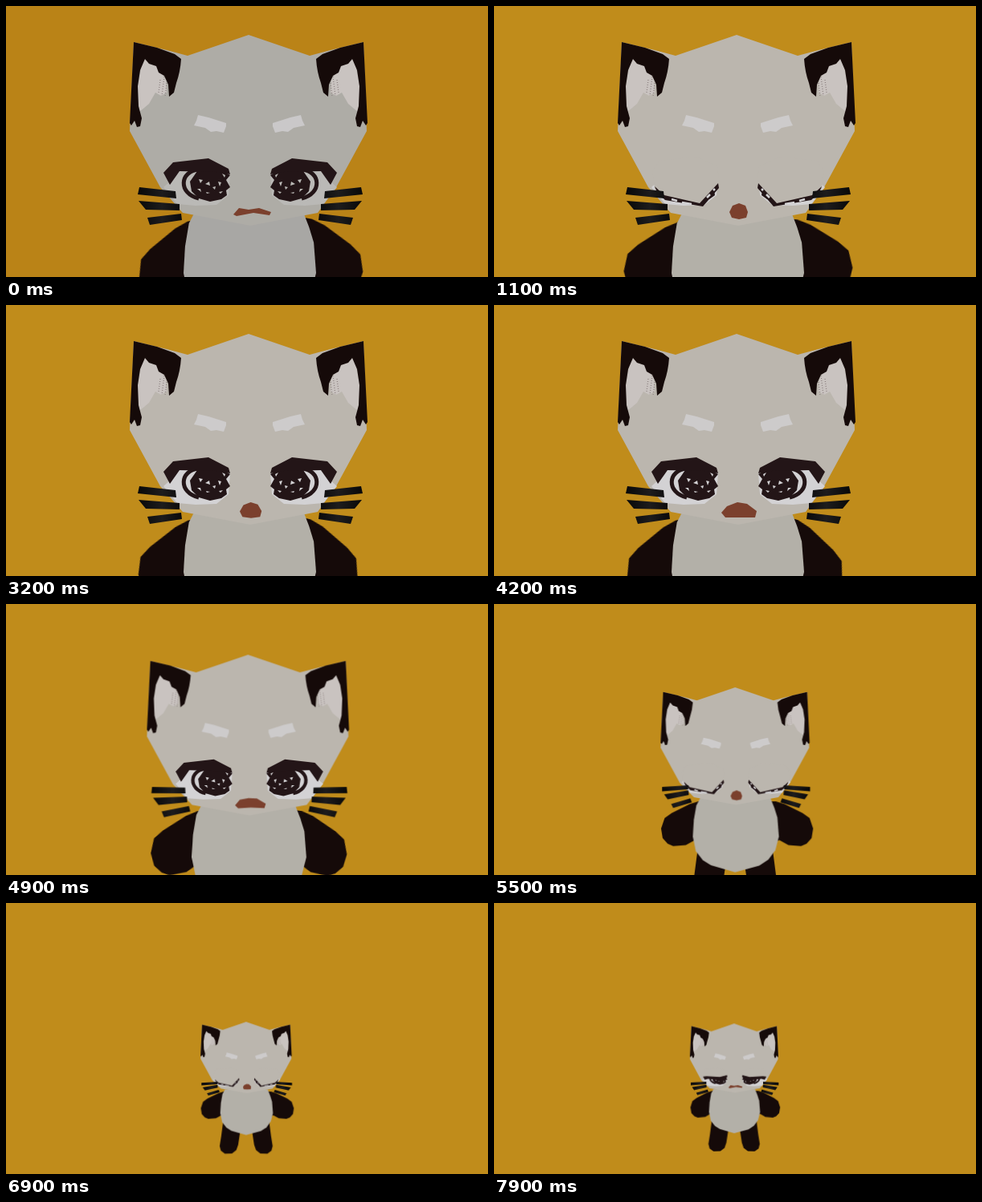
An HTML page for the animation above (8000 ms loop, 600 by 338 pixels).

```html
<!DOCTYPE html>
<html lang="en">
<head>
<meta charset="utf-8">
<title>Sad kitten</title>
<style>
  html, body { margin: 0; width: 100%; height: 100%; overflow: hidden; background: #c08c1b; }
  * { animation-duration: 8s; animation-timing-function: linear; animation-iteration-count: infinite; }

  /* The camera pulls straight back, so depth carries the zoom. */
  #stage {
    position: relative; width: 600px; height: 338px; overflow: hidden;
    background: #c08c1b; animation-name: wall;
    perspective: 1000px; perspective-origin: 297px 218px;
  }
  svg {
    position: absolute; left: 0; top: 0; overflow: visible;
    transform-origin: 297px 218px; animation-name: pullback;
  }

  .skin { fill: #bbb6ae; animation-name: skin; }
  .fur { fill: #150a09; }
  .ink { fill: #231517; }
  .white { fill: #d3d2d4; animation-name: white; }
  .head { animation-name: skin, chin; }
  .belly { fill: #b3b0a8; transform-origin: 303px 300px; animation-name: belly, widen; }
  .arm { transform-origin: 232px 268px; animation-name: left-arm; }
  .mirrored .arm { animation-name: right-arm; }
  .whiskers { animation-name: whiskers; }
  .eye { animation-name: lift-eye; }
  .lid { animation-name: skin, lid; }
  .lash { animation-name: lash; }
  .glint { animation-name: glint; }
  .mouth-place { animation-name: lift-mouth; }
  .mouth {
    fill: #7b402d; animation-name: talk;
    --wave: path("M283 260 L290 252 L302 254 L315 252 L330 257 L328 261 L308 258 L287 262 Z");
    --round: path("M293 257 L297 249 L305 246 L313 249 L316 257 L314 264 L305 266 L296 264 Z");
    --half: path("M292 257 L295 251 L303 247 L311 248 L318 255 L317 264 L305 265 L294 264 Z");
    --wide: path("M283 259 L290 251 L303 246 L315 248 L327 257 L325 265 L305 265 L288 265 Z");
  }

  @keyframes pullback {
    0%, 53.75% { transform: translateZ(0); animation-timing-function: cubic-bezier(.333, 0, .667, 1); }
    91.25%, 100% { transform: translateZ(-1690px); }
  }
  @keyframes wall { 0% { background: #ba8317; } 5%, 100% { background: #c08c1b; } }
  @keyframes skin { 0% { fill: #aeaca6; } 5%, 100% { fill: #bbb6ae; } }
  @keyframes belly { 0% { fill: #a8a7a4; } 5%, 100% { fill: #b3b0a8; } }
  @keyframes white { 0% { fill: #bab9b6; } 5%, 100% { fill: #d3d2d4; } }
  @keyframes widen { 0%, 53.75% { transform: scaleX(.965); } 68.75%, 100% { transform: none; } }

  @keyframes chin {
    0%, 53.75% { d: path("M302 36 L378 62 L404 55 L445 45 L449 156 L411 226 L388 258 L304 274 L220 258 L192 226 L154 156 L159 45 L200 55 L226 62 Z"); }
    75%, 100% { d: path("M302 36 L378 62 L404 55 L445 45 L449 156 L411 226 L388 253 L304 268 L220 253 L192 226 L154 156 L159 45 L200 55 L226 62 Z"); }
  }
  @keyframes left-arm {
    0% { transform: translate(-2px, 5px) rotate(-13deg); }
    13.75% { transform: translate(1px, 6px) rotate(-6deg); }
    28.75% { transform: translate(-1px, 5px) rotate(-10deg); }
    52.5% { transform: translate(-2px, 5px) rotate(-13deg); }
    68.75%, 86.25% { transform: translate(0, 0) rotate(0deg); }
    100% { transform: translate(0, -1px) rotate(-1deg); }
  }
  @keyframes right-arm {
    0% { transform: translate(-1px, 2px) rotate(-10deg); }
    13.75% { transform: translate(2px, 3px) rotate(-5deg); }
    28.75% { transform: translate(0, 3px) rotate(-12deg); }
    52.5% { transform: translate(2px, 4px) rotate(-17deg); }
    68.75%, 86.25% { transform: translate(-4px, 0) rotate(0deg); }
    100% { transform: translate(-4px, -1px) rotate(-1deg); }
  }
  @keyframes whiskers {
    0%, 53.75% { d: path("M166 226 L211 231 L212 240 L164 235 Z M165 243 L216 247 L216 255 L174 254 Z M176 264 L218 259 L219 267 L179 273 Z"); }
    68.75%, 100% { d: path("M157 234 L209 231 L209 239 L157 243 Z M161 249 L209 241 L210 250 L168 259 Z M175 268 L213 257 L216 265 L179 276 Z"); }
  }

  @keyframes lid {
    0%, 11.5%, 17%, 66.5%, 72%, 84%, 89.5%, 97.5% {
      d: path("M197 206 L206 193 L252 188 L278 200 L277 203 L252 190 L208 195 L196 208 Z");
    }
    12.9%, 14.6%, 68%, 69.5%, 85.5%, 87%, 100% {
      d: path("M197 206 L206 193 L252 188 L278 200 L281 222 L257 249 L213 240 L200 228 Z");
    }
  }
  @keyframes lash {
    0%, 11.5%, 17%, 66.5%, 72%, 84%, 89.5%, 97.5% {
      d: path("M196 208 L208 195 L252 190 L277 203 L279 210 L262 207 L216 206 L204 223 Z");
    }
    12.9%, 14.6%, 68%, 69.5%, 85.5%, 87%, 100% {
      d: path("M200 225 L212 236 L256 246 L279 221 L280 227 L260 250 L213 242 L203 232 Z");
    }
  }
  @keyframes glint {
    0%, 11.5%, 17%, 66.5%, 72%, 84%, 89.5%, 97.5% { opacity: 0; }
    12.9%, 14.6%, 68%, 69.5%, 85.5%, 87%, 100% { opacity: 1; }
  }
  @keyframes lift-eye { 0%, 53.75% { transform: none; } 91.25%, 100% { transform: translateY(-3px); } }
  @keyframes lift-mouth {
    0%, 53.75% { transform: translateY(0); }
    68.75% { transform: translateY(-5px); }
    86.25%, 100% { transform: translateY(-9px); }
  }
  @keyframes talk {
    0%, 2%, 18%, 34%, 58%, 74%, 97.5%, 100% { d: var(--wave); }
    5%, 13%, 14.5%, 39%, 48%, 68%, 69.5%, 92% { d: var(--round); }
    28%, 29.5%, 86.25% { d: var(--half); }
    9%, 23%, 44%, 52%, 53.5%, 63%, 80% { d: var(--wide); }
  }
</style>
</head>
<body>
<div id="stage">
  <svg width="600" height="480" viewBox="0 0 600 480">
    <defs>
      <linearGradient id="hair" x2="1">
        <stop offset="0" stop-color="#080808"/>
        <stop offset=".55" stop-color="#1d1c1d"/>
        <stop offset="1" stop-color="#0b0a0b"/>
      </linearGradient>
    </defs>

    <g class="limbs" data-axis="604">
      <path class="fur" d="M228 355 L221 409 L216 440 L220 455 L233 465 L256 464 L270 453 L276 436 L283 390 Z"/>
    </g>
    <g data-axis="608">
      <path class="fur arm" d="M229 263 L212 268 L176 286 L162 296 L155 317 L158 336 L168 347 L179 352 L204 350 L222 340 L250 350 L250 263 Z"/>
    </g>
    <path class="belly" d="M233 256 L225 271 L220 300 L218 333 L224 362 L238 380 L254 390 L302 404 L350 391 L368 379 L382 360 L389 333 L386 295 L380 276 L372 256 Z"/>
    <path class="skin head" d="M302 36 L378 62 L404 55 L445 45 L449 156 L411 226 L388 258 L304 274 L220 258 L192 226 L154 156 L159 45 L200 55 L226 62 Z"/>

    <g data-axis="604">
      <path fill="#c9c3c0" d="M170 66 L188 74 L199 92 L200 108 L193 112 L186 108 L178 122 L166 132 L163 105 Z"/>
      <path d="M197 88 L194 112 M192 92 L190 108 M200 96 L198 113" fill="none" stroke="#8e8382" stroke-width="1.3" stroke-dasharray="1 2"/>
      <path class="fur" d="M159 45 L188 52 L210 60 L218 66 Q217 82 212 96 L209 108 L203 113 L202 98 L197 87 L190 83 L187 75 L178 72 L173 66 L167 80 L164 100 L165 125 L169 140 L167 150 L163 151 L160 143 L156 149 L154 146 Z"/>
    </g>

    <g data-axis="606">
      <path class="white" style="animation-name:none" opacity=".75" d="M239 136 L252 139 L274 146 L274 150 L271 158 L262 156 L255 157 L248 152 L234 149 L237 143 Z"/>
    </g>

    <g data-axis="608">
      <g class="eye">
        <path class="white" d="M205 218 L214 204 L250 196 L279 209 L277 236 L262 248 L236 249 L213 247 L196 226 Z"/>
        <path d="M240 204 C216 206 214 234 240 240" fill="none" stroke="#231517" stroke-width="5"/>
        <path class="ink" d="M238 206 L252 204 L270 206 L279 211 L274 217 L279 226 L274 230 L275 236 L268 241 L254 244 L240 240 L231 231 L229 219 Z"/>
        <path class="white" d="M240 216 l5 1 l-3 4 Z M248 222 l5 -3 l1 5 Z M257 226 l4 -1 l-1 4 Z M264 219 l4 1 l-2 5 Z M238 228 l4 0 l1 4 Z M249 232 l5 1 l-4 1 Z M265 232 l5 -1 l-3 3 Z M269 209 l4 2 l-1 3 Z"/>
        <path class="skin lid" d="M197 206 L206 193 L252 188 L278 200 L277 203 L252 190 L208 195 L196 208 Z"/>
        <path class="ink lash" d="M196 208 L208 195 L252 190 L277 203 L279 210 L262 207 L216 206 L204 223 Z"/>
        <path class="glint" d="M221 241 L228 243 M234 245 L246 247 M265 239 L269 235 M273 230 L275 228" fill="none" stroke="#d3d2d4" stroke-width="2.6"/>
      </g>
    </g>

    <g data-axis="608">
      <path class="whiskers" fill="url(#hair)" d="M166 226 L211 231 L212 240 L164 235 Z M165 243 L216 247 L216 255 L174 254 Z M176 264 L218 259 L219 267 L179 273 Z"/>
    </g>
    <g class="mouth-place"><path class="mouth" d="M283 260 L290 252 L302 254 L315 252 L330 257 L328 261 L308 258 L287 262 Z"/></g>
  </svg>
</div>
<script>
  // Each left-hand part gets a twin, flipped about its own axis.
  for (const part of document.querySelectorAll("[data-axis]")) {
    const twin = part.cloneNode(true);
    twin.setAttribute("transform", `translate(${part.dataset.axis}) scale(-1 1)`);
    twin.classList.add("mirrored");
    part.after(twin);
  }
</script>
</body>
</html>
```
